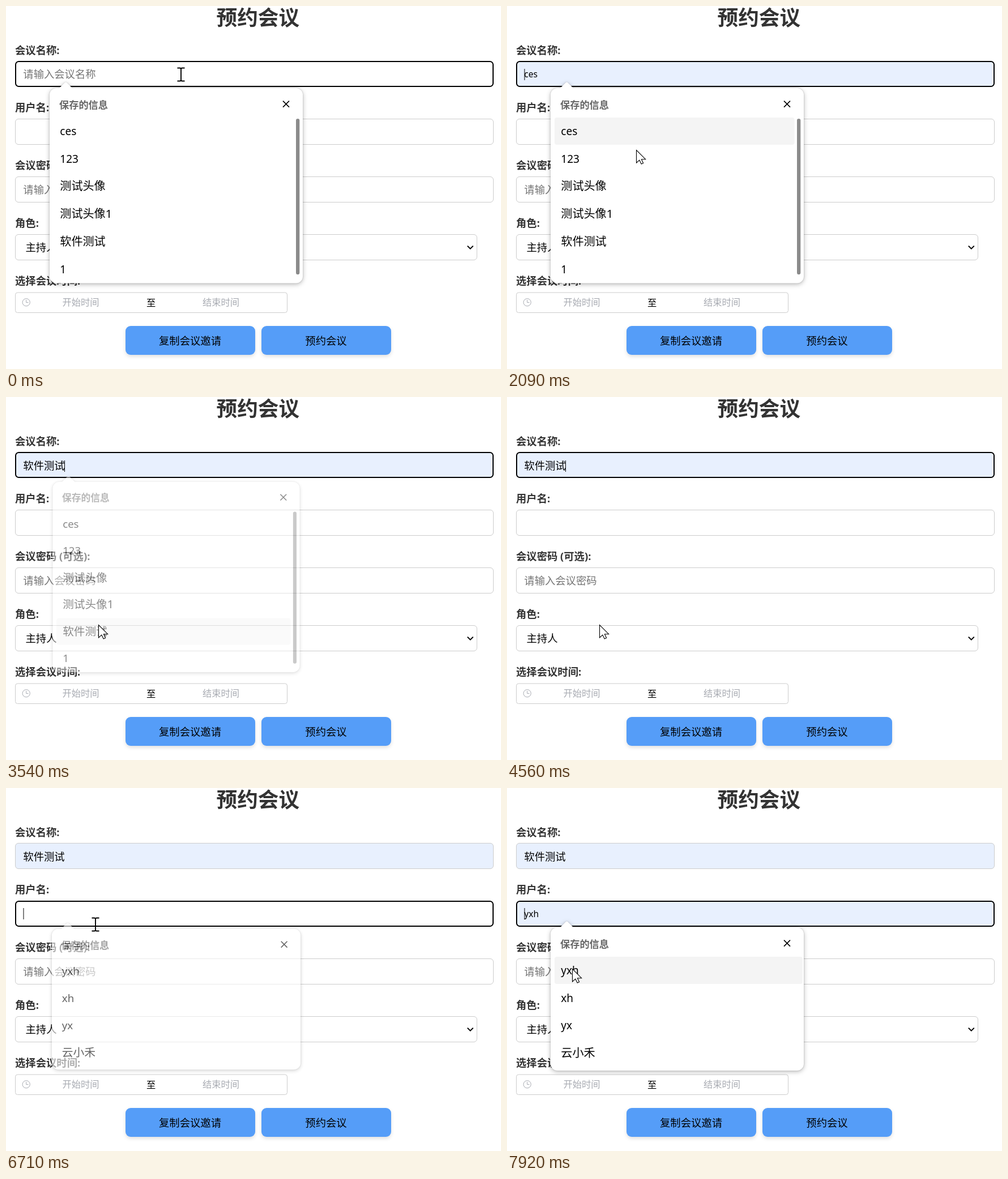
An HTML page that plays this animation: 874x641 px, repeating every 8000 ms.

```html
<!DOCTYPE html>
<html lang="zh-CN">
<head>
<meta charset="utf-8">
<title>预约会议</title>
<style>
  html, body { margin: 0; width: 100%; height: 100%; overflow: hidden; background: #fff; }
  svg { display: block; width: 874px; height: 641px; }
  text { font-family: "Noto Sans", "Noto Sans CJK SC", "Noto Sans CJK", sans-serif; white-space: pre; }
  .bold { font-weight: 700; fill: #333; }
  .title { font-weight: 700; fill: #666; }
  .hint { fill: #757575; }
  .date { fill: #a8abb2; }
  .box { fill: #fff; stroke: #ccc; }
  .focus { stroke: #000; stroke-width: 2; }
  .filled { fill: #e8f0fe; }
  .button { fill: #559df8; filter: drop-shadow(0 3px 3px rgba(0, 0, 0, .12)); }
  .card { fill: #fff; filter: drop-shadow(0 2px 4px rgba(0, 0, 0, .24)) drop-shadow(0 0 1px rgba(0, 0, 0, .2)); }
  .row { fill: #f4f4f4; }
  .bar { fill: #8b8b8b; }
  .line { fill: none; stroke: #000; }
  .clock { fill: none; stroke: #a8abb2; }
</style>
</head>
<body>
<svg id="stage" viewBox="0 0 874 641"></svg>
<script>
const LOOP = 8000;
const TEXT = 18.33;
const ROW = 48.7;
const PITCH = 101.8;
const BLINK = 528;
const PICK = 3480;   // an entry is chosen for the first field
const SWITCH = 6590; // focus moves to the second field
const stage = document.getElementById('stage');

function add(parent, tag, attrs, content) {
  const el = document.createElementNS('http://www.w3.org/2000/svg', tag);
  set(el, attrs);
  if (content) el.textContent = content;
  parent.append(el);
  return el;
}
function set(el, attrs) {
  for (const key in attrs) el.setAttribute(key, attrs[key]);
}
const rect = (parent, x, y, width, height, rx, cls) =>
  add(parent, 'rect', { x, y, width, height, rx, class: cls });
const label = (parent, x, y, size, content, cls = '') =>
  add(parent, 'text', { x, y, 'font-size': size, class: cls }, content);
const path = (parent, d, cls, width = 1) =>
  add(parent, 'path', { d, class: cls, 'stroke-width': width });
const show = (el, on) => set(el, { visibility: on ? 'visible' : 'hidden' });

// Form
label(stage, 371.5, 34.3, 36.67, '预约会议', 'bold');
['会议名称:', '用户名:', '会议密码 (可选):', '角色:', '选择会议时间:']
  .forEach((name, i) => label(stage, 16, 84.6 + i * PITCH, TEXT, name, 'bold'));

const fields = ['请输入会议名称', '', '请输入会议密码'].map((hint, i) => {
  const y = 97 + i * 102;
  return {
    y,
    box: rect(stage, 16.5, y + .5, 844, 45, 5.5, 'box'),
    hint: label(stage, 30.3, y + 29.6, TEXT, hint, 'hint'),
    value: label(stage, 30.3, y + 31.2, TEXT, '')
  };
});

rect(stage, 16.5, 403.5, 815, 45, 5.5, 'box');
label(stage, 34.5, 432.8, TEXT, '主持人');
path(stage, 'M814.8 423.6l5 5 5-5', 'line', 2);

rect(stage, 16.5, 506, 480, 35.5, 4, 'box');
add(stage, 'circle', { cx: 35.7, cy: 523.3, r: 6.6, class: 'clock' });
path(stage, 'M35.7 519v4.6h3.8', 'clock');
label(stage, 99.5, 529.2, 16.3, '开始时间', 'date');
label(stage, 248, 529.6, 16.3, '至');
label(stage, 347, 529.2, 16.3, '结束时间', 'date');

['复制会议邀请', '预约会议'].forEach((name, i) => {
  const x = 211 + i * 240;
  rect(stage, x, 565, 229, 51, 9, 'button');
  label(stage, x + 114 - name.length * TEXT / 2, 597.6, TEXT, name);
});

const caret = rect(stage, 0, 0, 1, 20, 0, '');

// Saved-entry popups
function makePopup(top, height, rows, scrolls) {
  const group = add(stage, 'g');
  path(group,
    `M89 ${top}H94L103.5 ${top - 9.5}Q105.5 ${top - 11.5} 107.5 ${top - 9.5}L117 ${top}H512` +
    `a12 12 0 0 1 12 12v${height - 24}a12 12 0 0 1 -12 12H89a12 12 0 0 1 -12 -12v${24 - height}a12 12 0 0 1 12 -12Z`,
    'card');
  label(group, 94, top + 35.6, 17.2, '保存的信息', 'title');
  path(group, `M489 ${top + 22.6}l11 11m0-11l-11 11`, 'line', 1.6);
  const mark = rect(group, 84, 0, scrolls ? 423.5 : 438, 48, 4, 'row');
  rows.forEach((row, i) =>
    label(group, 95.3, top + 83 + i * ROW, /^\w+$/.test(row) ? 19 : 20.1, row));
  if (scrolls) rect(group, 512, top + 54, 6.3, 275, 3.1, 'bar');
  return { group, mark, rows, top, middle: top + height / 2 + 23 };
}
const topics = makePopup(145, 344.5, ['ces', '123', '测试头像', '测试头像1', '软件测试', '1'], true);
const users = makePopup(246, 253, ['yxh', 'xh', 'yx', '云小禾'], false);

function setPopup(popup, opacity, row) {
  const { group, mark, middle, top } = popup;
  const scale = 1 - .044 * (1 - opacity);
  set(group, {
    opacity,
    transform: `translate(300 ${middle}) scale(${scale}) translate(-300 ${-middle})`
  });
  set(mark, { opacity: row < 0 ? 0 : 1, y: top + 52 + row * ROW });
}

// Pointers, both with the hotspot at 0,0
const arrow = path(stage, 'M.5 .5V23L5.8 18.2L9.2 25L12.6 23.4L9.4 16.7H16.6Z', 'line', 1.1);
arrow.style.fill = '#fff';
const beam = path(stage,
  'M-6.5 -11.5H-2Q0 -11.5 0 -9.5Q0 -11.5 2 -11.5H6.5M0 -10V10M-6.5 11.5H-2Q0 11.5 0 9.5Q0 11.5 2 11.5H6.5',
  'line', 1.9);

const ramp = (t, from, to) => Math.min(1, Math.max(0, (t - from) / (to - from)));
const smooth = k => k * k * (3 - 2 * k);

// Pointer moves; bend bows the path sideways
const home = { x: 308.5, y: 121 };
const moves = [
  { from: 1900, to: 2090, x: 228, y: 254 },
  { from: 2140, to: 2740, x: 163, y: 402 },
  { from: 5600, to: 6170, x: 157.5, y: 240.5, bend: 16 },
  { from: 7530, to: 7650, x: 124, y: 314 },
  { from: 7710, to: 7920, x: 115, y: 319 }
];

function pointerAt(t) {
  let { x, y } = home;
  for (const move of moves) {
    const k = smooth(ramp(t, move.from, move.to));
    x += (move.x - x) * k + (move.bend || 0) * Math.sin(Math.PI * k);
    y += (move.y - y) * k;
  }
  return { x: Math.round(x), y: Math.round(y) };
}

// Hover trails the pointer slightly
const hoverRow = (popup, t) =>
  Math.max(-1, Math.floor((pointerAt(t - 65).y - popup.top - 52) / ROW));

function setField({ box, hint, value, y }, focused, content, preview) {
  const inset = focused ? 1 : .5;
  set(box, {
    x: 16 + inset, y: y + inset, width: 845 - 2 * inset, height: 46 - 2 * inset,
    class: `box ${focused ? 'focus' : ''} ${content ? 'filled' : ''}`
  });
  show(hint, !content);
  value.textContent = content;
  set(value, { 'font-size': preview ? 15.6 : TEXT, y: y + (preview ? 29 : 31.2) });
}

function draw(t) {
  const picked = t >= PICK, second = t >= SWITCH;
  const topicRow = hoverRow(topics, Math.min(t, PICK));
  const userRow = second ? hoverRow(users, t) : -1;
  // Closing lingers half-faded before it vanishes
  const topicFade = 1 - .55 * ramp(t, PICK - 20, PICK + 60) - .45 * ramp(t, PICK + 200, PICK + 280);
  const userFade = ramp(t, SWITCH, SWITCH + 200);

  setField(fields[0], !second, topics.rows[topicRow] || '', !picked);
  setField(fields[1], second, users.rows[userRow] || '', true);
  setPopup(topics, topicFade, topicRow);
  setPopup(users, userFade, userRow);

  const reset = second ? SWITCH : picked ? PICK : 510 - 2 * BLINK;
  set(caret, {
    x: picked && !second ? 103 : 30.5,
    y: second ? 212 : picked ? 112 : 111
  });
  show(caret, Math.floor((t - reset) / BLINK) % 2 === 0);

  const { x, y } = pointerAt(t);
  const covered = topicFade > 0 && y > topics.top || userFade > 0 && y > users.top;
  const typing = !covered && fields.some(field => y >= field.y && y <= field.y + 46);
  show(beam, typing);
  show(arrow, !typing);
  set(typing ? beam : arrow, { transform: `translate(${x} ${y})` });
}

const start = performance.now();
function tick() {
  draw((performance.now() - start) % LOOP);
  requestAnimationFrame(tick);
}
tick();
</script>
</body>
</html>
```
